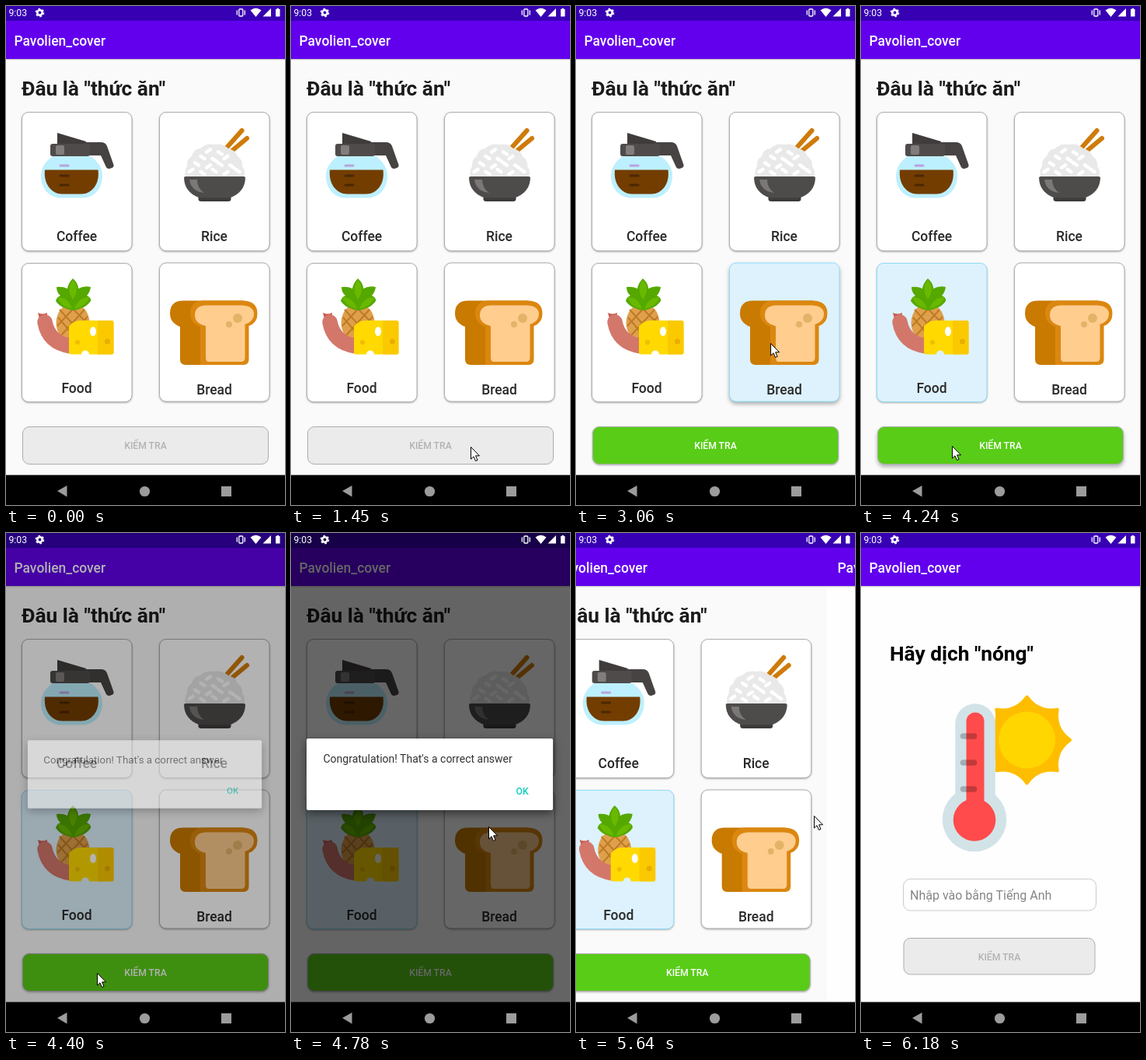
Recreate the animation shown at these times as an HTML page. Size 359 px wide and 641 px high, loop 6.48 s.

```html
<!DOCTYPE html>
<html lang="vi">
<head>
<meta charset="utf-8">
<title>Quiz</title>
<style>
  html, body { margin: 0; width: 100%; height: 100%; overflow: hidden; background: #fff; }
  svg { display: block; width: 359px; height: 641px; }
  text { font-family: Roboto, "Noto Sans", sans-serif; }
  .bar { font-size: 17.45px; font-weight: 500; fill: #fff; }
  .head { font-size: 26.3px; font-weight: 700; fill: #1b1b1b; }
  .label { font-size: 17.45px; font-weight: 500; fill: #292929; text-anchor: middle; }
  .btn { font-size: 12.2px; font-weight: 500; text-anchor: middle; fill: #b2b2b2; }
  .off { fill: #ebebeb; stroke: #adadad; }
</style>
</head>
<body>
<svg viewBox="0 0 359 641">
  <rect width="359" height="641" fill="#fff"/>

  <g id="quiz">
    <rect y="68" width="359" height="541" fill="#fafafa"/>
    <text class="head" x="20" y="115">Đâu là "thức ăn"</text>
    <g id="cards"></g>

    <g id="coffee">
      <path d="M60 193H109C118 199 124 208 124 218C124 236 112 246.500 98 246.500H71C57 246.500 45 236 45 218C45 208 51 199 60 193Z" fill="#bdf0ff"/>
      <path d="M50 210.500H118.500C121 229 110 241.500 97 241.500H72C59 241.500 48 229 50 210.500Z" fill="#733d00"/>
      <path d="M70 205H80" stroke="#b6a4dc" stroke-width="3" stroke-linecap="round"/>
      <path d="M70 218H80M70 230H80" stroke="#4a2800" stroke-width="3" stroke-linecap="round"/>
      <path d="M66 163L103 174V179H66Z" fill="#403c3c"/>
      <path d="M101 175H122Q128 175 130 180L138.500 204Q139 207 136 208Q130 211 128 205L122 192H101Z" fill="#474343"/>
      <rect x="57" y="177" width="51" height="16" rx="3" fill="#4f4b4b"/>
      <rect x="64" y="179" width="11" height="12" rx="2" fill="#827d7d"/>
    </g>

    <g id="rice">
      <path d="M283 183L303.500 160M289.500 187L310 170" stroke="#cf7b0a" stroke-width="6" stroke-linecap="round"/>
      <path d="M231 220Q229 211 233 206Q232 197 239 193Q241 184 250 183Q257 176 268 178Q278 176 286 183Q295 185 298 193Q305 198 304 206Q309 212 306 220Z" fill="#e9e9e9"/>
      <g id="grains" stroke="#fff" stroke-width="4.5" stroke-linecap="round"></g>
      <path d="M247.500 244H289.500V248Q289.500 251 286 251H251Q247.500 251 247.500 248Z" fill="#3e3b3b"/>
      <path d="M229 221Q229 219 231 219H306Q308 219 308 221C307.500 233 301 242 288 246.500H249C236 242 229.500 233 229 221Z" fill="#4e4b4b"/>
      <path d="M236 223H246Q246 234 255 240Q238 238 236 223Z" fill="#7b7777"/>
    </g>

    <g id="food">
      <ellipse cx="86" cy="407" rx="21.500" ry="25" fill="#dfa04c"/>
      <path d="M67 400L91 428M69 390L101 425M81 384L106 409M105 399L80 428M101 390L71 423M91 384L66 411" stroke="#bf7a24" stroke-width="2"/>
      <path d="M86 350Q93 356 93 363Q101 359 109 361Q108 368 104 372Q110 375 109 379Q104 386 97 388Q86 394 76 388Q69 386 64 379Q65 374 70 372Q65 368 65 361Q73 360 79 363Q80 356 86 350Z" fill="#55a800"/>
      <path d="M86 352Q96 363 86 377Q77 363 86 352ZM66 374Q80 374 85 389Q70 386 66 374ZM108 374Q93 374 88 389Q103 386 108 374Z" fill="#69b900"/>
      <path d="M41 394Q47 397 53 394L52 405H44Z" fill="#c9594f"/>
      <path d="M50 406Q55 433 84 437" fill="none" stroke="#d4776b" stroke-width="19.500" stroke-linecap="round"/>
      <path d="M81 411Q88 404 95 404H136Q138.500 404 138.500 407V445Q138.500 447.500 136 447.500H107A5 5 0 0 0 97 447.500H84Q81 447.500 81 445Z" fill="#ffd900"/>
      <path d="M118 404H136Q138.500 404 138.500 407V445Q138.500 447.500 136 447.500H118Z" fill="#fbc900"/>
      <ellipse cx="112" cy="418" rx="4" ry="6" fill="#fff"/>
      <circle cx="130.500" cy="431" r="3.500" fill="#e8ae00"/>
      <circle cx="92" cy="432" r="3" fill="#f0bd00"/>
    </g>

    <g id="bread">
      <path d="M228 378.500H305V461H231Q224 461 224 454V412Q211 407 211 395Q211 378.500 228 378.500Z" fill="#c97a00"/>
      <path d="M253 378.500H306Q323.500 379.500 323.500 395Q323.500 407 312.500 411V454Q312.500 461 305.500 461H250V412Q237 407 237 395Q237 379.500 253 378.500Z" fill="#db8710"/>
      <path d="M257 384.500H304Q319 385.500 319 396Q319 405 307.500 409V452Q307.500 457 302.500 457H261Q257 457 257 452V411Q243 408 243 397Q243 385.500 257 384.500Z" fill="#ffcd8e"/>
      <circle cx="298" cy="401" r="6" fill="#e2b468"/>
      <circle cx="287" cy="409" r="4" fill="#e2b468"/>
    </g>

    <text class="label" x="91" y="301.500">Coffee</text>
    <text class="label" x="268" y="301.500">Rice</text>
    <text class="label" x="91" y="496.500">Food</text>
    <text class="label" x="268" y="498.800">Bread</text>
    <rect id="check" class="off" x="21.500" y="540.500" width="316" height="48" rx="8.500"/>
    <text id="checkText" class="btn" x="179.500" y="569.300">KIỂM TRA</text>
  </g>

  <g id="next">
    <rect y="68" width="359" height="541" fill="#fefefe"/>
    <text class="head" x="37" y="164" style="fill:#000">Hãy dịch "nóng"</text>
    <path id="sun" fill="#ffbd00" stroke="#ffbd00" stroke-width="4" stroke-linejoin="round"/>
    <circle cx="213.500" cy="266" r="36.500" fill="#ffd600"/>
    <circle cx="146" cy="368" r="41.300" fill="#d2e3e8"/>
    <path d="M147 245V360" stroke="#d2e3e8" stroke-width="51.500" stroke-linecap="round"/>
    <circle cx="146" cy="368.500" r="27.300" fill="#ff4b4b"/>
    <path d="M147 242V360" stroke="#ff4b4b" stroke-width="23" stroke-linecap="round"/>
    <path d="M131.500 261H145.500M131.500 295H145.500M131.500 329H145.500" stroke="#000" stroke-opacity=".24" stroke-width="7.500" stroke-linecap="round"/>
    <rect x="54.500" y="444.500" width="248" height="40.500" rx="9" fill="#fff" stroke="#cbcbcb"/>
    <text x="63" y="470.500" font-size="16" fill="#858585">Nhập vào bằng Tiếng Anh</text>
    <rect class="off" x="55" y="520.500" width="246" height="46.500" rx="8.500"/>
    <text class="btn" x="178" y="548.700">KIỂM TRA</text>
  </g>

  <rect y="68" width="359" height="1" fill="#c9c9c9"/>
  <rect y="69" width="359" height="1" fill="#ececec"/>
  <rect y="19" width="359" height="49" fill="#6200ee"/>
  <text id="quizBar" class="bar" x="10.500" y="50.500">Pavolien_cover</text>
  <text id="nextBar" class="bar" x="10.500" y="50.500">Pavolien_cover</text>
  <rect width="359" height="19" fill="#3700b3"/>
  <rect id="dim" width="359" height="603"/>
  <g fill="#fff">
    <text x="3.500" y="13" font-size="12.200">9:03</text>
    <circle cx="43.500" cy="8.500" r="3.200" fill="none" stroke="#fff" stroke-width="2.600"/>
    <circle cx="43.500" cy="8.500" r="5" fill="none" stroke="#fff" stroke-width="1.600" stroke-dasharray="2.600 2.636"/>
    <rect x="299.800" y="4" width="5" height="9" rx="1" fill="none" stroke="#fff" stroke-width="1.300"/>
    <path d="M297.300 5.500V11.500M307.300 5.500V11.500" stroke="#fff" stroke-width="1.300"/>
    <path d="M314.500 5.500Q321.500 0 328.500 5.500L321.500 14Z"/>
    <path d="M341 3V13.500H330.500Z"/>
    <path d="M347 4H348.500V3H351V4H352.500V13.500H347Z"/>
  </g>

  <g id="dialog">
    <rect x="20" y="264" width="317" height="92" rx="2" fill="#fff" style="filter:drop-shadow(0 4px 6px rgba(0,0,0,.5))"/>
    <rect id="ripple" x="276" y="318" width="44" height="28" rx="3" fill="#03dac5"/>
    <text x="41.500" y="295" font-size="14" fill="#333">Congratulation! That's a correct answer</text>
    <text x="289.500" y="336.300" font-size="12.200" font-weight="500" fill="#0ccfbd">OK</text>
  </g>

  <rect y="602.500" width="359" height="39" fill="#000"/>
  <g fill="#9c9c9c">
    <path d="M66 623L78.500 616V630.500Z"/>
    <circle cx="178.500" cy="623.500" r="6.600"/>
    <rect x="277" y="617" width="13" height="13"/>
  </g>
  <path id="cursor" d="M.5 .5V16L4 12.800L6.500 18.500L9 17.400L6.600 11.800H11.500Z" fill="#fff" stroke="#000"/>
</svg>

<script>
const LOOP = 6480;
const $ = id => document.getElementById(id);
const clamp = v => Math.max(0, Math.min(1, v));
const ease = v => (1 - Math.cos(Math.PI * clamp(v))) / 2;

function add(parent, tag, attrs) {
  const el = document.createElementNS("http://www.w3.org/2000/svg", tag);
  for (const k in attrs) el.setAttribute(k, attrs[k]);
  return parent.appendChild(el);
}

const cards = [[20.5, 136.5], [197.5, 136.5], [20.5, 330.5], [197.5, 330]].map(([x, y]) =>
  add($("cards"), "rect", { x, y, width: 141.5, height: 178, rx: 8.5 }));

// rice grains in staggered rows, tilted alternately
for (let row = 0; row < 4; row++) {
  const n = row + 2;
  for (let i = 0; i < n; i++) {
    const x = 268 + (i - (n - 1) / 2) * 15, y = 186 + row * 8.5 + (i % 2) * 3;
    const dy = (i + row) % 3 ? 1.6 : -1.6;
    add($("grains"), "path", { d: `M${x - 2.5} ${y - dy}L${x + 2.5} ${y + dy}` });
  }
}

const polar = (r, k) => {
  const a = k * Math.PI / 8;
  return (213.5 + r * Math.cos(a)).toFixed(1) + " " + (266 + r * Math.sin(a)).toFixed(1);
};
let rays = "M" + polar(55.5, 0);
for (let k = 1; k < 16; k += 2) rays += `Q${polar(38, k)} ${polar(55.5, k + 1)}`;
$("sun").setAttribute("d", rays + "Z");

const ticks = [0];
for (const [a, b, n] of [[1450, 2060, 9], [2140, 2750, 9], [2830, 2910, 2], [3060, 3690, 9],
  [3760, 4010, 4], [4160, 4780, 9], [4860, 5490, 9], [5560, 6180, 9]])
  for (let i = 0; i < n; i++) ticks.push(Math.round((a + (b - a) * i / (n - 1)) / 10) * 10);

// pointer: time, x, y
const path = [[1450, 231, 566], [1530, 214, 520], [1830, 95, 250], [1990, 92, 236], [2140, 96, 234],
  [2370, 246, 228], [2520, 250, 232], [2750, 240, 391], [2910, 252, 432], [3220, 248, 434],
  [3540, 100, 478], [3690, 97, 485], [4010, 117, 565], [4400, 117, 565], [4780, 254, 377],
  [5090, 296, 334], [5330, 298, 335], [5490, 301, 343], [5640, 306, 363], [5950, 328, 520], [6110, 340, 642]];

// selected card: time, index
const picks = [[1910, 0], [2450, 1], [3060, 3], [3620, 2]];

function pointAt(t) {
  const i = path.findIndex(p => p[0] > t);
  if (i < 1) return null;
  const [a, x, y] = path[i - 1], [b, u, v] = path[i], k = ease((t - a) / (b - a));
  return [x + (u - x) * k, y + (v - y) * k];
}

const shadow = l => `drop-shadow(0 ${1 + 2 * l}px ${0.8 + 1.6 * l}px rgba(0,0,0,.3))`;
const slide = t => -359 * ease((t - 5537) / 500);
const shift = (id, x, y) => $(id).setAttribute("transform", `translate(${x} ${y})`);

function draw(t) {
  const pick = picks.filter(p => p[0] <= t).pop();
  cards.forEach((card, i) => {
    const on = pick && pick[1] === i;
    card.setAttribute("fill", on ? "#ddf2fd" : "#fff");
    card.setAttribute("stroke", on ? "#8fdcf8" : "#adadad");
    card.style.filter = shadow(on ? clamp(1 - (t - pick[0]) / 230) : 0);
  });

  const press = Math.sin(Math.PI * clamp((t - 4110) / 320));
  const check = $("check");
  check.style.fill = pick ? "#58cc17" : "";
  check.style.filter = pick ? shadow(press * 1.3) : "none";
  $("checkText").style.fill = pick ? "#fff" : "";

  const open = ease((t - 4280) / 220) * (1 - ease((t - 5260) / 220));
  const s = t < 5000 ? 0.9 + 0.1 * open : 1;
  $("dim").setAttribute("opacity", 0.6 * open);
  $("dialog").setAttribute("opacity", open);
  $("dialog").setAttribute("transform", `translate(178.5 310) scale(${s}) translate(-178.5 -310)`);
  $("ripple").setAttribute("opacity", t > 5150 ? 0.15 : 0);

  const out = slide(t), into = 359 + slide(t - 5);
  shift("quiz", out, 0);
  shift("quizBar", out, 0);
  shift("next", into, 0);
  shift("nextBar", into, 0);

  const p = pointAt(t);
  $("cursor").style.display = p ? "" : "none";
  if (p) shift("cursor", p[0], p[1]);
}

const start = performance.now();
function tick() {
  const t = (performance.now() - start) % LOOP;
  draw(ticks.filter(k => k <= t).pop());
  requestAnimationFrame(tick);
}
tick();
</script>
</body>
</html>
```
